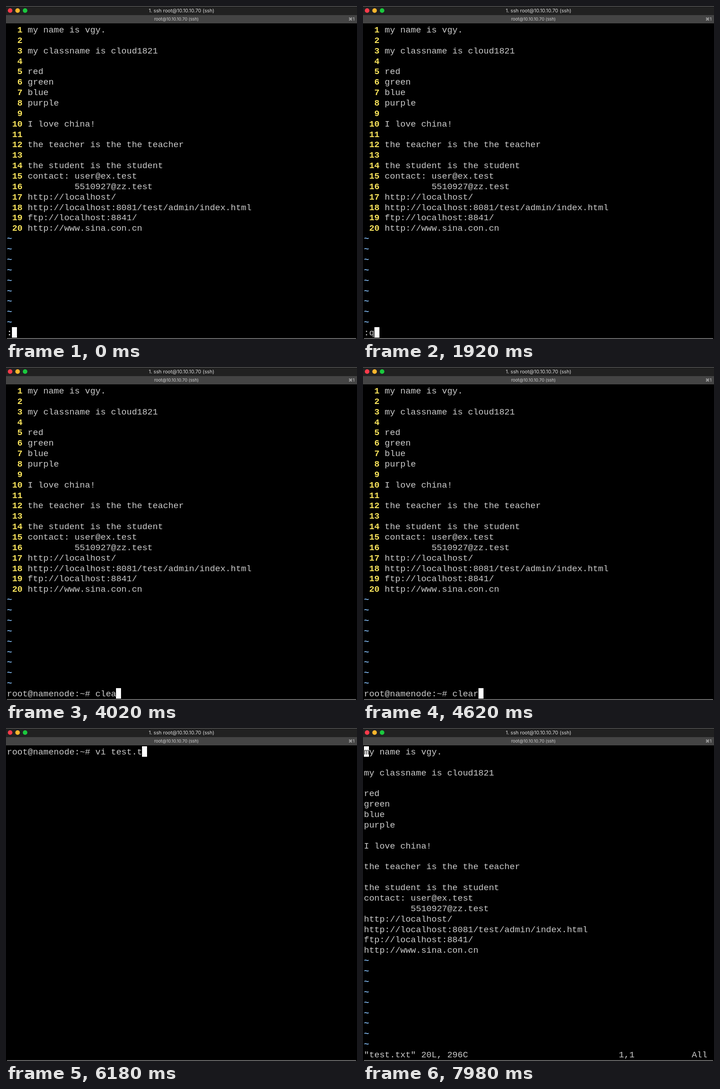
An HTML page with a canvas for the animation above (8000 ms loop, 769 by 729 pixels).

```html
<!DOCTYPE html>
<html lang="en">
<head>
<meta charset="utf-8">
<title>Terminal session</title>
<style>
  html, body { margin: 0; width: 100%; height: 100%; overflow: hidden; background: #000; }
  canvas { display: block; }
</style>
</head>
<body>
<canvas id="stage" width="769" height="729"></canvas>
<script>
const ctx = document.getElementById('stage').getContext('2d');
const LOOP = 8000, COL = 11.4, ROW = 22.86, LEFT = 2, TOP = 40, LAST_ROW = 29;
const MONO = '19px "Liberation Mono", monospace';
const UI = 'Inter, "DejaVu Sans", sans-serif';
const WHITE = '#cbcbcb', YELLOW = '#f9e45c', BLUE = '#79aee3';
const PROMPT = 'root@namenode:~# ';

const file = `my name is vgy.

my classname is cloud1821

red
green
blue
purple

I love china!

the teacher is the the teacher

the student is the student
contact: user@ex.test
         5510927@zz.test
http://localhost/
http://localhost:8081/test/admin/index.html
ftp://localhost:8841/
http://www.sina.con.cn`.split('\n');

// Each entry: start time, screen, text on the input line.
const steps = [
  [0, 'numbered', ':'],
  [1500, 'numbered', ':q'],
  [2040, 'numbered', PROMPT],
  [2520, 'numbered', PROMPT + 'c'],
  ...typed(3480, 240, 'numbered', 'c', 'lea'),
  [4260, 'numbered', PROMPT + 'clear'],
  [4680, 'shell', PROMPT],
  ...typed(4980, 120, 'shell', '', 'vi'),
  ...typed(5340, 135, 'shell', 'vi', ' test.txt'),
  [7020, 'editor', '']
];

function typed(start, gap, screen, before, keys) {
  return [...keys].map((_, i) =>
    [start + i * gap, screen, PROMPT + before + keys.slice(0, i + 1)]);
}

function write(text, col, row, color = WHITE, bold = false) {
  ctx.font = (bold ? 'bold ' : '') + MONO;
  ctx.textAlign = 'left';
  ctx.fillStyle = color;
  ctx.fillText(text, LEFT + col * COL, Math.round(TOP + 18 + row * ROW));
}

function cursor(col, row) {
  ctx.fillStyle = '#fff';
  ctx.fillRect(Math.round(LEFT + col * COL), Math.round(TOP + row * ROW), 11, 23);
}

function label(text, x, y, size, align, color) {
  ctx.font = `${size}px ${UI}`;
  ctx.textAlign = align;
  ctx.fillStyle = color;
  ctx.fillText(text, x, y);
}

function drawWindow() {
  ctx.fillStyle = '#000';
  ctx.fillRect(0, 0, 769, 729);
  ctx.fillStyle = '#212121';
  ctx.fillRect(0, 0, 769, 20);
  ctx.fillStyle = '#444';
  ctx.fillRect(0, 20, 769, 18);
  ctx.fillStyle = '#6a6a6a';
  ctx.fillRect(0, 0, 769, 1);
  ctx.fillRect(2, 727, 765, 2);
  ['#fc3b4b', '#fdb62c', '#1ac93e'].forEach((color, i) => {
    ctx.fillStyle = color;
    ctx.beginPath();
    ctx.arc(9 + i * 16.4, 10, 5, 0, 7);
    ctx.fill();
  });
  label('1. ssh root@10.10.10.70 (ssh)', 384.5, 14, 10.8, 'center', '#dedede');
  label('root@10.10.10.70 (ssh)', 373.5, 32, 9.4, 'center', '#d2d2d2');
  label('⌘1', 763.5, 32, 9.4, 'right', '#d2d2d2');
}

function drawFile(numbered) {
  file.forEach((line, row) => {
    if (numbered) write(String(row + 1).padStart(3), 0, row, YELLOW, true);
    write(line, numbered ? 4 : 0, row);
  });
  for (let row = file.length; row < LAST_ROW; row++) write('~', 0, row, BLUE, true);
}

function render(time) {
  const [, screen, input] = steps.findLast(([start]) => start <= time);
  drawWindow();
  if (screen !== 'shell') drawFile(screen === 'numbered');
  if (screen === 'editor') {
    write('"test.txt" 20L, 296C', 0, LAST_ROW);
    write('1,1', 49, LAST_ROW);
    write('All', 63, LAST_ROW);
    cursor(0, 0);
    write(file[0][0], 0, 0, '#333');
  } else {
    const row = screen === 'shell' ? 0 : LAST_ROW;
    write(input, 0, row, WHITE, input === ':');
    cursor(input.length, row);
  }
}

const begin = performance.now();
function tick() {
  render((performance.now() - begin) % LOOP);
  requestAnimationFrame(tick);
}
tick();
</script>
</body>
</html>
```
